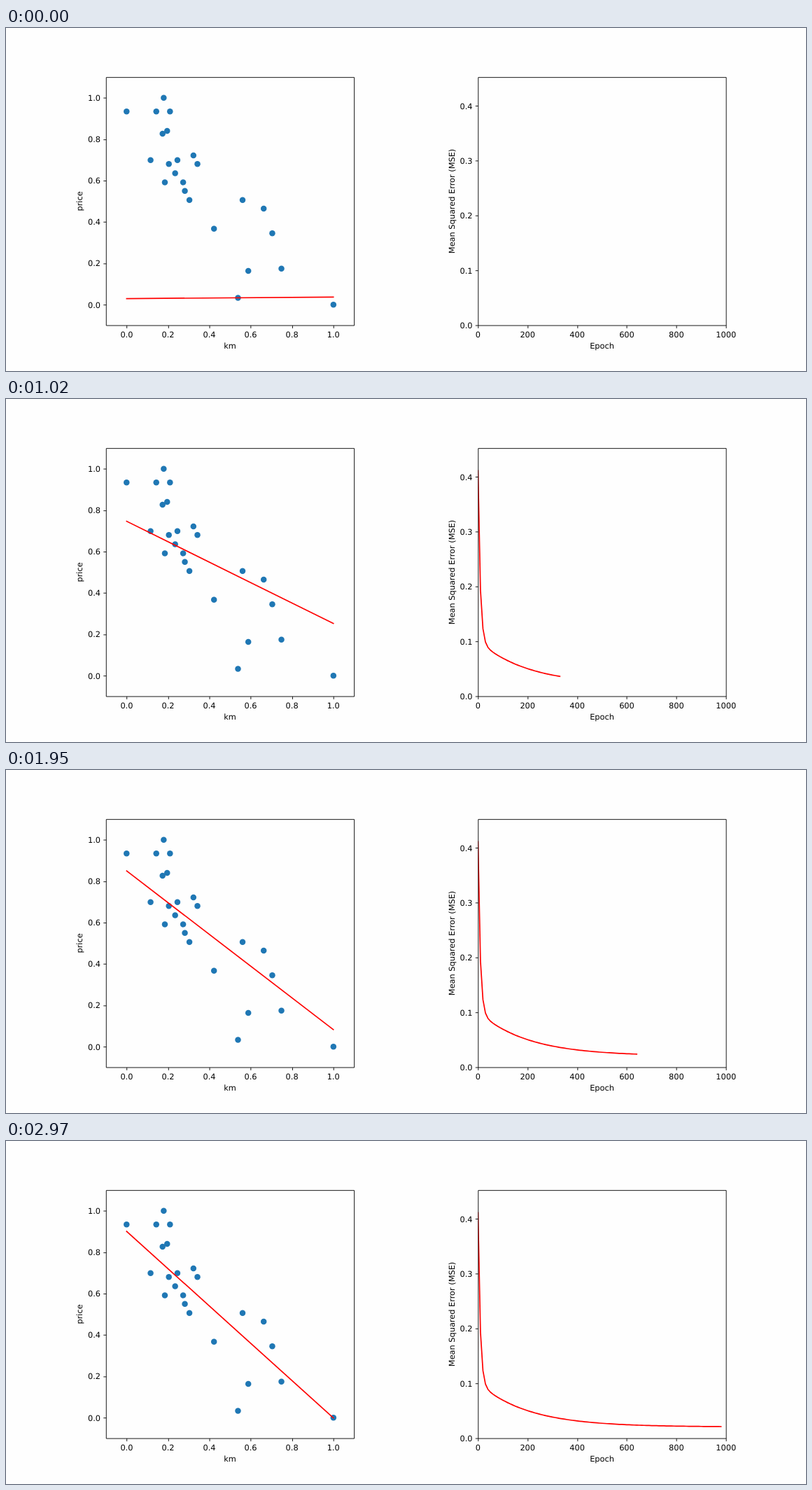
Animation of 1143x490 px, one loop 3000 ms. Source, as an HTML page:

```html
<!DOCTYPE html>
<html lang="en">
<head>
<meta charset="utf-8">
<title>Linear regression training</title>
<style>
  html, body { margin: 0; width: 100%; height: 100%; overflow: hidden; background: #fefefe; }
  svg { display: block; width: 100vw; height: 100vh; }
  text { font: 13.89px "DejaVu Sans", sans-serif; fill: #000; text-rendering: geometricPrecision; }
  .axis { fill: none; stroke: #000; stroke-width: 1.11; }
  .plot { fill: none; stroke: #f00; stroke-width: 2.083; stroke-linecap: square; stroke-linejoin: round; }
  .dot { fill: #1f77b4; }
</style>
</head>
<body>
<svg id="chart" viewBox="0 0 1400 600" preserveAspectRatio="none">
  <clipPath id="inside"><rect x="826" y="86" width="434" height="434"/></clipPath>
</svg>
<script>
const SIZE = 434, TOP = 86, BOTTOM = TOP + SIZE, LEFT = 175, RIGHT = LEFT + 1.5 * SIZE;
const STEP_MS = 30, STEPS = 100, EPOCHS_PER_STEP = 10, RATE = 0.05;

// Mileages in thousands, grouped by price in tens.
const kmByPrice = {
  365: [240], 380: [139.8], 440: [150.5], 445: [185.5], 525: [176], 535: [114.8],
  580: [166.8], 599: [89, 144.5], 620: [84], 639: [82, 63], 660: [74], 680: [97.5, 67],
  690: [76, 48.2], 699: [93], 749: [60.9], 755: [65.7], 799: [54, 68.5, 22.9], 829: [61.8]
};
const cars = Object.entries(kmByPrice).flatMap(([price, kms]) => kms.map(km => [km, +price]));

function normalise(values) {
  const min = Math.min(...values), max = Math.max(...values);
  return values.map(v => (v - min) / (max - min));
}
const xs = normalise(cars.map(car => car[0]));
const ys = normalise(cars.map(car => car[1]));

// Gradient descent, keeping the fitted line and the error of every tenth epoch.
const fits = [], losses = [];
let slope = 0, offset = 0;
for (let epoch = 0; epoch < STEPS * EPOCHS_PER_STEP; epoch++) {
  const errors = xs.map((x, i) => offset + slope * x - ys[i]);
  const mean = rule => errors.reduce((sum, err, i) => sum + rule(err, xs[i]), 0) / errors.length;
  slope -= RATE * mean((err, x) => err * x);
  offset -= RATE * mean(err => err);
  if (epoch % EPOCHS_PER_STEP === 0) {
    fits.push([offset, slope]);
    losses.push(mean(err => err * err));
  }
}

const kmX = v => LEFT + (v + 0.1) / 1.2 * SIZE;
const priceY = v => BOTTOM - (v + 0.1) / 1.2 * SIZE;
const epochX = v => RIGHT + v / 1000 * SIZE;
const lossY = v => BOTTOM - v / (1.1 * losses[0]) * SIZE;
const snap = v => Math.round(v) + 0.5;

const chart = document.getElementById("chart");
function add(tag, attrs, content) {
  const el = document.createElementNS("http://www.w3.org/2000/svg", tag);
  for (const name in attrs) el.setAttribute(name, attrs[name]);
  if (content !== undefined) el.textContent = content;
  return chart.appendChild(el);
}
function label(content, x, y, anchor, extra) {
  add("text", { x, y, "text-anchor": anchor, ...extra }, content);
}

const ticks = (step, last, digits) =>
  Array.from({ length: Math.round(last / step) + 1 }, (_, i) => (i * step).toFixed(digits));

function axes(left, xTicks, toX, xName, yTicks, toY, yName) {
  const tick = 4.86, middle = TOP + SIZE / 2, nameX = left - 41;
  let d = `M${left + 0.5} ${TOP + 0.5}h${SIZE}v${SIZE}h${-SIZE}z`;
  for (const t of xTicks) {
    d += `M${snap(toX(+t))} ${BOTTOM + 0.5}v${tick}`;
    label(t, toX(+t), BOTTOM + 21.3, "middle");
  }
  for (const t of yTicks) {
    d += `M${left + 0.5} ${snap(toY(+t))}h${-tick}`;
    label(t, left - 9.7, toY(+t) + 5.4, "end");
  }
  add("path", { class: "axis", d });
  label(xName, left + SIZE / 2, BOTTOM + 40.5, "middle");
  label(yName, nameX, middle, "middle", { transform: `rotate(-90 ${nameX} ${middle})` });
}

// Dots sit on whole units of the drawing grid.
xs.forEach((x, i) => add("circle", {
  class: "dot", cx: Math.round(kmX(x)), cy: Math.round(priceY(ys[i])), r: 5.2
}));
const fitLine = add("path", { class: "plot" });
const lossLine = add("path", { class: "plot", "clip-path": "url(#inside)" });

const unitTicks = ticks(0.2, 1, 1);
axes(LEFT, unitTicks, kmX, "km", unitTicks, priceY, "price");
axes(RIGHT, ticks(200, 1000, 0), epochX, "Epoch", ticks(0.1, 0.4, 1), lossY, "Mean Squared Error (MSE)");

const curve = losses.map((v, i) => `${epochX(i * EPOCHS_PER_STEP)} ${lossY(v)}`);

function draw(step) {
  const [b, w] = fits[step];
  fitLine.setAttribute("d", `M${kmX(0)} ${priceY(b)}L${kmX(1)} ${priceY(b + w)}`);
  lossLine.setAttribute("d", step > 1 ? "M" + curve.slice(0, step).join("L") : "");
}

const start = performance.now();
function tick() {
  draw(Math.floor((performance.now() - start + 0.5) / STEP_MS) % STEPS);
  requestAnimationFrame(tick);
}
tick();
</script>
</body>
</html>
```
